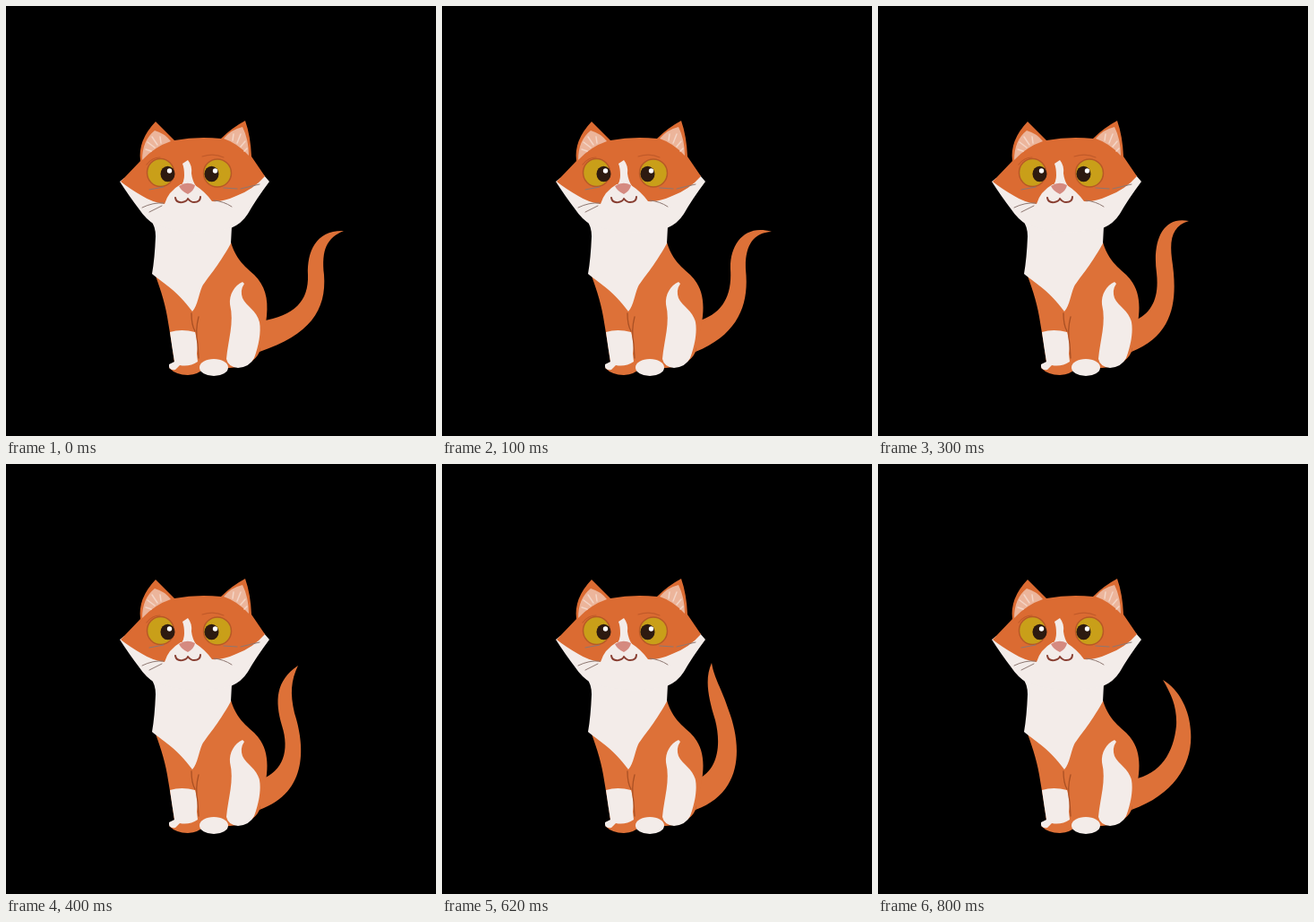
Animation, 480 px wide and 480 px high, one loop 0.9 s. Source, as an HTML page:

```html
<!DOCTYPE html>
<html lang="en">
<head>
<meta charset="utf-8">
<title>Cat swishing its tail</title>
<style>
  html, body { margin: 0; width: 100%; height: 100%; overflow: hidden; background: #000; }
  svg { display: block; width: 100vw; height: 100vh; }
  .fur { fill: #dd7138; }
  .white { fill: #f3ece9; }
  .line { fill: none; stroke-linecap: round; stroke-linejoin: round; }
</style>
</head>
<body>
<svg viewBox="0 0 480 480">
  <path id="tail" class="fur"/>

  <g id="body">
    <path class="fur" d="M165 296 C171 312 177 329 180 347 L185 377 L188 398 L182 404 Q190 412 203 412 Q216 411 219 405
      L250 404 Q276 402 283 386 C286 370 290 358 291 346 C293 326 289 312 277 300 C262 287 255 279 250 260 L205 290Z"/>
    <path class="white" d="M161 238 Q167 246 167 257 Q166 282 163 299 C172 307 191 317 208 341
      C214 334 215 322 219 313 C225 303 236 292 251 265 L252 246 L220 215Z"/>
    <path class="white" d="M183 364 Q196 360 211 364 Q215 377 213 388 L214 397 Q205 403 194 401 L189 406 Q181 407 182 400 L188 397 Q185 379 183 364Z"/>
    <path class="white" d="M264 308 C255 312 249 322 250 333 C255 354 248 372 246 394 Q248 403 259 404 Q272 403 277 393
      C282 380 285 364 283 353 C280 340 268 335 264 326 Q261 317 266 310Z"/>
    <ellipse class="white" cx="232" cy="403.500" rx="16" ry="9.500"/>
    <path class="line" stroke="#a95024" stroke-width="1.300" d="M207 343 Q207 356 211 363 M215 347 Q211 362 214 377 L215 393"/>
  </g>

  <g id="head">
    <path class="white" d="M127 196 Q138 213 148 226 Q156 238 166 244 Q205 258 251 248 Q263 243 270 232 Q279 216 294 196 L288 189 L210 180 L132 192Z"/>
    <path fill="#db6b32" d="M128 196 L150 173 Q147 150 167 129 L188 150 Q214 145 240 148 Q252 136 267 128
      Q273 145 274 168 L289 190 Q276 205 257 212 Q242 219 230 218 Q222 207 211 200 L195 199 Q181 207 177 221 Q163 219 152 212 Q138 204 128 196Z"/>
    <path fill="#ecb59b" d="M152 172 Q152 150 166 139 Q177 142 184 151 Q166 157 152 172Z M243 148 Q251 138 264 135 Q271 149 271 167 Q258 153 243 148Z"/>
    <path class="line" stroke="#f4d5c6" stroke-width="1.500" d="M163 146 L169 155 M158 152 L166 158 M156 160 L162 162 M172 146 L173 153 M262 143 L258 153 M267 151 L262 157 M269 159 L266 162 M254 143 L253 150"/>
    <path class="white" d="M203 172 Q208 178 207 187 Q208 195 212 201 L195 201 Q199 196 199 189 Q199 181 197 176Z"/>

    <g fill="#c99f19" stroke="#b75926" stroke-width="1.500">
      <ellipse cx="172.500" cy="186" rx="15" ry="15.500"/>
      <ellipse cx="236" cy="186.500" rx="15.500" ry="15.500"/>
    </g>
    <g fill="#2d1a10">
      <ellipse cx="180.500" cy="187.500" rx="8" ry="8.800"/>
      <ellipse cx="229.500" cy="187.500" rx="8" ry="8.800"/>
    </g>
    <g fill="#fff">
      <circle cx="182.500" cy="184" r="2.700"/>
      <circle cx="233.500" cy="184" r="2.700"/>
    </g>

    <path fill="#d58a80" d="M193 201 Q202 195 211 200 Q210 206 203 210 Q196 207 193 201Z"/>
    <path class="line" stroke="#883e31" stroke-width="2" d="M189 214 Q190 220 197 219 Q202 218 203 215 Q206 219 210 219 Q217 219 217 213"/>
    <path class="line" stroke="#c15a29" stroke-width="1.200" d="M219 168 Q232 164 243 169 M157 177 Q163 169 172 169"/>
    <path class="line" stroke="#8d7771" stroke-width="1" d="M160 205 L176 202 M152 225 Q164 219 176 220 M160 230 L174 223 M243 203 L258 204 M232 217 Q243 218 252 224 M262 204 L283 199"/>
  </g>
</svg>
<script>
// Each pose: inner edge up to the tip, then outer edge back down.
const poses = [
  [0,   "322 345 338 330 337 300 C336 274 346 250 377 251 C358 259 352 272 355 300 C358 340 339 367"],
  [100, "312 344 324 325 322 294 C321 266 338 243 368 252 C347 253 338 268 339 294 C343 332 332 366"],
  [300, "306 343 314 326 311 298 C306 262 318 234 347 240 C330 245 325 258 328 282 C334 322 334 366"],
  [400, "309 343 317 320 308 292 C300 264 301 242 326 225 C318 242 317 256 322 278 C333 312 339 366"],
  [500, "308 342 312 314 305 286 C297 260 293 240 301 222 C304 240 312 250 320 275 C334 312 338 366"],
  [700, "309 344 318 318 319 286 C319 262 311 246 301 227 C320 238 333 264 335 290 C339 328 330 366"],
  [800, "316 346 330 322 333 292 C334 272 328 258 318 241 C337 252 348 276 349 298 C352 332 333 368"]
];
const LOOP = 900;
const tail = document.getElementById("tail");
const start = performance.now();

function draw(now) {
  const t = Math.max(0, now - start) % LOOP;
  const [, curve] = poses.findLast(([from]) => t >= from);
  tail.setAttribute("d", `M285 352 C${curve} 283 386Z`);
  requestAnimationFrame(draw);
}
draw(start);
</script>
</body>
</html>
```
